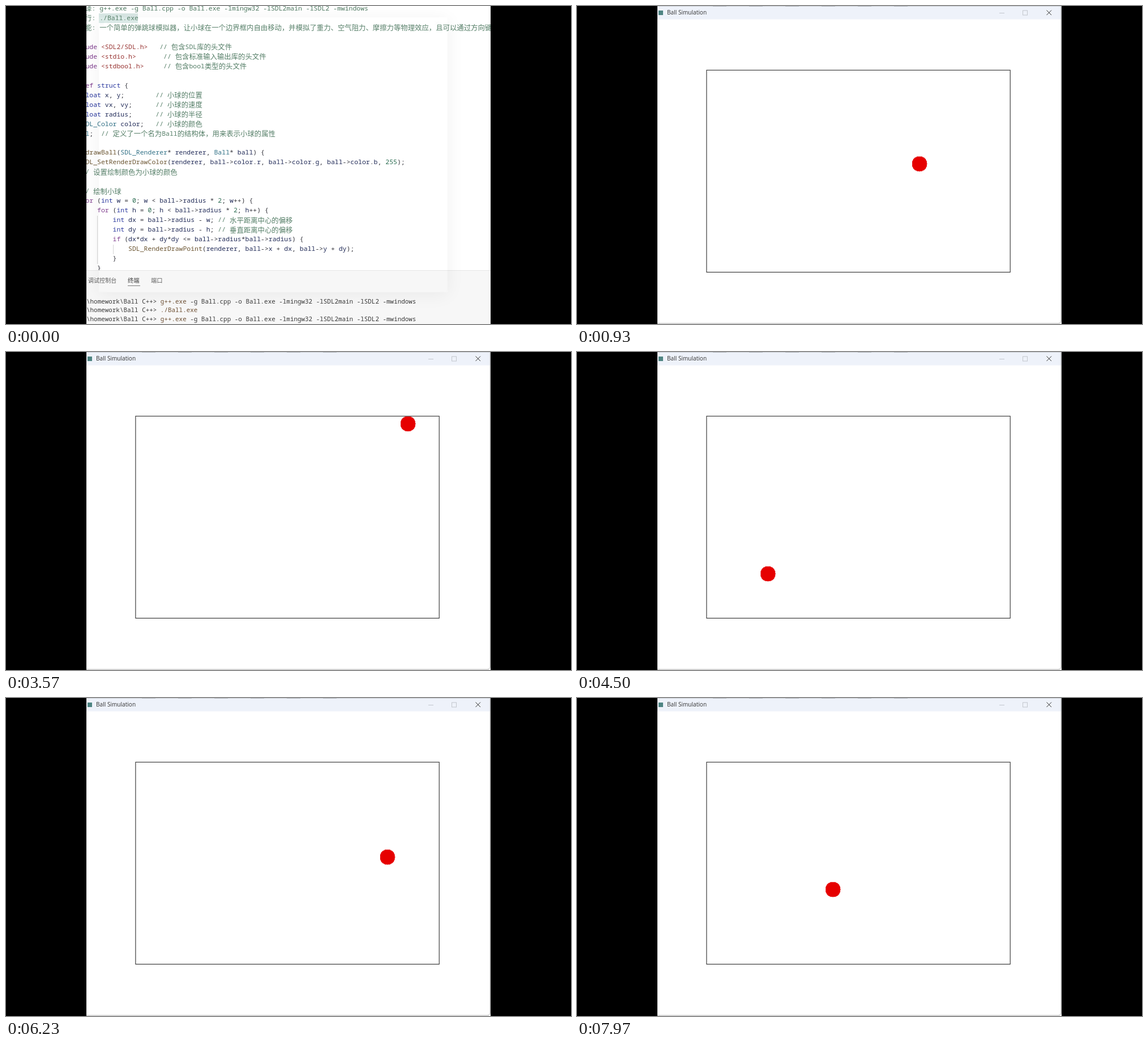
Write an HTML page with a canvas that moves like this. It is 998x561 px and loops after 8 s.

```html
<!DOCTYPE html>
<html lang="zh">
<head>
<meta charset="utf-8">
<title>Ball Simulation</title>
<style>
  html, body { margin: 0; width: 100%; height: 100%; overflow: hidden; background: #000; }
  canvas { display: block; }
</style>
</head>
<body>
<canvas id="stage" width="998" height="561"></canvas>
<script>
const ctx = document.getElementById('stage').getContext('2d');
const LOOP = 8000, FPS = 30;
const LEFT = 142, RIGHT = 856, WIDTH = RIGHT - LEFT, HEIGHT = 561;
const OPEN_TIME = 0.23, BALL_START = 0.6;
const DRAG = 0.12, GRAVITY = 309, SCALE = 0.891, RADIUS = 15;

// The ball centre turns round at these limits
const WALL_L = 242.5, WALL_R = 751.5, TOP = 126.5, FLOOR = 456.5;

// Bounce times in seconds; the ball flies freely in between
const bouncesX = [0.43, 0.806, 1.257, 1.819, 2.51, 3.469, 4.755, 6.53, 9.144]
  .map((t, i) => [t, i % 2 ? WALL_R : WALL_L]);
const bouncesY = [0.45, 0.745, 1.108, 1.5, 2.002, 2.591, 3.567, 4.652, 6.967, 8.74]
  .map((t, i) => [t, i % 2 || t > 4 ? FLOOR : TOP]);

const BUILD = 'g++.exe -g Ball.cpp -o Ball.exe -lmingw32 -lSDL2main -lSDL2 -mwindows';
const CODE = [
  '// 编译: ' + BUILD,
  '// 运行: ./Ball.exe',
  '// 功能: 一个简单的弹跳球模拟器，让小球在一个边界框内自由移动，并模拟了重力、空气阻力、摩擦力等物理效应，且可以通过方向键控制',
  '',
  '#include <SDL2/SDL.h>   // 包含SDL库的头文件',
  '#include <stdio.h>       // 包含标准输入输出库的头文件',
  '#include <stdbool.h>     // 包含bool类型的头文件',
  '',
  'typedef struct {',
  '    float x, y;        // 小球的位置',
  '    float vx, vy;      // 小球的速度',
  '    float radius;      // 小球的半径',
  '    SDL_Color color;   // 小球的颜色',
  '} Ball;  // 定义了一个名为Ball的结构体，用来表示小球的属性',
  '',
  'void drawBall(SDL_Renderer* renderer, Ball* ball) {',
  '    SDL_SetRenderDrawColor(renderer, ball->color.r, ball->color.g, ball->color.b, 255);',
  '    // 设置绘制颜色为小球的颜色',
  '',
  '    // 绘制小球',
  '    for (int w = 0; w < ball->radius * 2; w++) {',
  '        for (int h = 0; h < ball->radius * 2; h++) {',
  '            int dx = ball->radius - w; // 水平距离中心的偏移',
  '            int dy = ball->radius - h; // 垂直距离中心的偏移',
  '            if (dx*dx + dy*dy <= ball->radius*ball->radius) {',
  '                SDL_RenderDrawPoint(renderer, ball->x + dx, ball->y + dy);',
  '            }',
  '        }'
];

// Syntax colours, first match wins
const RULES = [
  [/^\/\//, '#4f7a62'],
  [/^<\w/, '#96302e'],
  [/^(#include|typedef|for|if)$/, '#7d3a8c'],
  [/^(struct|float|int|void)$/, '#26349c'],
  [/^(SDL_Color|SDL_Renderer|Ball)$/, '#2a6c82'],
  [/^(SDL_\w+|drawBall)$/, '#664f2a'],
  [/^\d+$/, '#24684c'],
  [/^\w+$/, '#1c2654']
];
const TOKEN = /\/\/.*|<[\w\/]+\.h>|#?\w+|\s+|[^\w\s]/g;
const CJK = /[\u3000-\u9fff\uff00-\uffef]+|[^\u3000-\u9fff\uff00-\uffef]+/g;

const lerp = (a, b, p) => a + (b - a) * p;

function box(color, x, y, w, h) {
  ctx.fillStyle = color;
  ctx.fillRect(x, y, w, h);
}

function line(color, x1, y1, x2, y2) {
  ctx.strokeStyle = color;
  ctx.lineWidth = 1;
  ctx.beginPath();
  ctx.moveTo(x1, y1);
  ctx.lineTo(x2, y2);
  ctx.stroke();
}

// Draws mixed Latin and Chinese text, returns the x after it
function write(text, x, y, size, color) {
  ctx.fillStyle = color;
  for (const run of text.match(CJK) || []) {
    const wide = run.charCodeAt(0) >= 0x3000;
    ctx.font = wide
      ? size * 1.081 + 'px "Noto Sans CJK SC", "Noto Sans CJK", sans-serif'
      : '500 ' + size + 'px "Noto Sans Mono", "DejaVu Sans Mono", monospace';
    ctx.fillText(run, x, y);
    x += ctx.measureText(run).width;
  }
  return x;
}

function drawEditor() {
  box('#fff', LEFT, 0, WIDTH, HEIGHT);
  box('#d9e8e5', 164, 13, 69, 17);
  line('#d4d4d4', 161.5, 370, 161.5, 455);
  line('#d4d4d4', 189.5, 421, 189.5, 438);
  CODE.forEach((text, i) => {
    let x = 106;
    for (const token of text.match(TOKEN) || []) {
      const rule = RULES.find(([test]) => test.test(token));
      x = write(token, x, 4.5 + i * 16.98, 11.47, rule ? rule[1] : '#2c2c34');
    }
  });

  box('#f7f7f7', LEFT, 466, WIDTH, HEIGHT - 466);
  line('#e6e6e6', LEFT, 466.5, RIGHT, 466.5);
  write('调试控制台', 145, 484, 9.3, '#5a5a5a');
  write('终端', 215, 484, 9.6, '#333');
  write('端口', 256, 484, 9.6, '#5a5a5a');
  line('#777', 215, 493.5, 237, 493.5);
  [BUILD, './Ball.exe', BUILD].forEach((command, i) => {
    const y = 521.5 + i * 15.6;
    const [name, ...args] = command.split(' ');
    let x = write('\\homework\\Ball C++> ', LEFT, y, 10.92, '#3a3a3a');
    x = write(name, x, y, 10.92, '#6e5034');
    write(' ' + args.join(' '), x, y, 10.92, '#3a3a3a');
  });
}

function drawWindow() {
  box('#fff', LEFT, 0, WIDTH, HEIGHT);
  box('#eef2fa', LEFT, 1, WIDTH, 22.5);
  box('#c9cdd3', LEFT, 0, WIDTH, 1);
  // Tips of the text line behind the window
  ctx.setLineDash([24, 40]);
  line('rgba(70,75,85,.25)', 240, 0.5, 620, 0.5);
  ctx.setLineDash([]);

  box('#4f8583', 144, 8, 8, 8);
  ctx.fillStyle = '#333';
  ctx.font = '10.1px "Open Sans", "Noto Sans", sans-serif';
  ctx.fillText('Ball Simulation', 159, 12);
  line('#c2c6cd', 746, 12.5, 755, 12.5);
  ctx.strokeRect(787.5, 8, 8, 8);
  line('#333', 829.5, 7.5, 838, 16);
  line('#333', 838, 7.5, 829.5, 16);

  ctx.strokeStyle = '#a8a8a8';
  ctx.beginPath();
  ctx.moveTo(LEFT, 560);
  ctx.lineTo(850, 560);
  ctx.quadraticCurveTo(855, 560, 855, 555);
  ctx.lineTo(855, 0);
  ctx.stroke();
}

function drawOpening(p) {
  const x = lerp(164, LEFT, p), y = lerp(20, 0, p);
  const w = lerp(616, WIDTH, p), h = lerp(485, HEIGHT, p);

  // Shadow outside the window only
  ctx.save();
  ctx.beginPath();
  ctx.rect(0, 0, 998, HEIGHT);
  ctx.rect(x, y, w, h);
  ctx.clip('evenodd');
  ctx.shadowColor = `rgba(0,0,0,${lerp(0.06, 0.3, p)})`;
  ctx.shadowBlur = 30;
  ctx.shadowOffsetY = 4;
  box('#fff', x, y, w, h);
  ctx.restore();

  ctx.save();
  ctx.globalAlpha = lerp(0.03, 1, p);
  ctx.translate(x, y);
  ctx.scale(w / WIDTH, h / HEIGHT);
  ctx.translate(-LEFT, 0);
  drawWindow();
  ctx.restore();
}

// Position in free flight between two bounces, under drag and a constant pull
function fly(bounces, t, pull) {
  const next = bounces.findIndex(([time]) => time > t);
  const [t0, a] = bounces[next - 1], [t1, b] = bounces[next];
  const span = t1 - t0, s = t - t0, fall = pull / DRAG;
  const ease = (1 - Math.exp(-DRAG * s)) / (1 - Math.exp(-DRAG * span));
  return a + fall * s + (b - a - fall * span) * ease;
}

// Disc built from whole rows, as a point-by-point renderer does
function drawBall(x, y) {
  ctx.save();
  ctx.translate(x, y);
  ctx.scale(SCALE, SCALE);
  ctx.translate(-0.5, -0.5);
  ctx.beginPath();
  for (let dy = 1 - RADIUS; dy <= RADIUS; dy++) {
    const half = Math.floor(Math.sqrt(RADIUS * RADIUS - dy * dy));
    const from = Math.max(-half, 1 - RADIUS);
    ctx.rect(from, dy, half + 1 - from, dy < RADIUS ? 1.2 : 1);
  }
  ctx.fillStyle = '#e60000';
  ctx.fill();
  ctx.restore();
}

function draw(t) {
  box('#000', 0, 0, 998, HEIGHT);
  ctx.save();
  ctx.beginPath();
  ctx.rect(LEFT, 0, WIDTH, HEIGHT);
  ctx.clip();
  ctx.textBaseline = 'middle';
  if (t < OPEN_TIME) {
    drawEditor();
    drawOpening(1 - (1 - t / OPEN_TIME) ** 3);
  } else {
    drawWindow();
  }
  if (t >= BALL_START) {
    ctx.strokeStyle = '#2c2c2c';
    ctx.lineWidth = 1.1;
    ctx.strokeRect(228.9, 113.2, 536.3, 356.4);
    drawBall(fly(bouncesX, t, 0), fly(bouncesY, t, GRAVITY));
  }
  ctx.restore();
}

const start = performance.now();
function tick() {
  const ms = (performance.now() - start) % LOOP;
  draw(Math.floor((ms + 4) * FPS / 1000) / FPS);
  requestAnimationFrame(tick);
}
tick();
</script>
</body>
</html>
```
